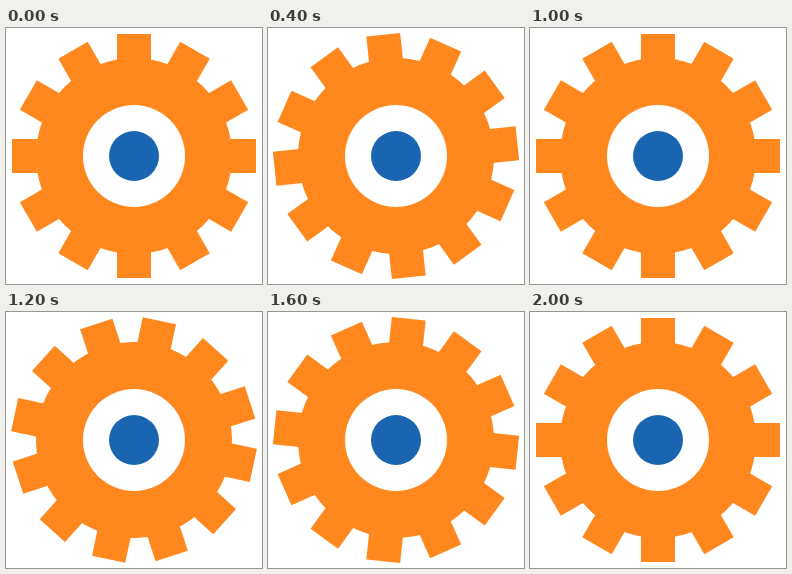
Write an HTML page that moves like this. It is 256 px wide and 256 px high and loops after 2.2 s.

```html
<!DOCTYPE html>
<html lang="en">
<head>
<meta charset="utf-8">
<title>Turning gear</title>
<style>
  html, body { margin: 0; width: 100%; height: 100%; overflow: hidden; background: #fff; }
  svg { display: block; width: 100%; height: 100%; }
</style>
</head>
<body>
<svg viewBox="0 0 256 256">
  <g id="gear" fill="#ff881e">
    <circle cx="128" cy="128" r="98"/>
  </g>
  <circle cx="128" cy="128" r="51" fill="#fff"/>
  <circle cx="128" cy="128" r="25" fill="#1a65b1"/>
</svg>
<script>
  const STEP_MS = 200, STEPS = 11, STEP_DEG = 12, TEETH = 12;
  const gear = document.getElementById('gear');

  // Each bar spans the gear and forms two opposite teeth.
  for (let i = 0; i < TEETH / 2; i++) {
    const bar = document.createElementNS(gear.namespaceURI, 'rect');
    const attrs = {
      x: 111, y: 6, width: 34, height: 244,
      transform: `rotate(${i * 360 / TEETH} 128 128)`
    };
    for (const key in attrs) bar.setAttribute(key, attrs[key]);
    gear.append(bar);
  }

  function draw(ms) {
    const step = Math.floor(ms / STEP_MS) % STEPS;
    gear.setAttribute('transform', `rotate(${step * STEP_DEG} 128 128)`);
  }

  const start = performance.now();
  function tick() {
    draw(performance.now() - start);
    requestAnimationFrame(tick);
  }
  tick();
</script>
</body>
</html>
```
